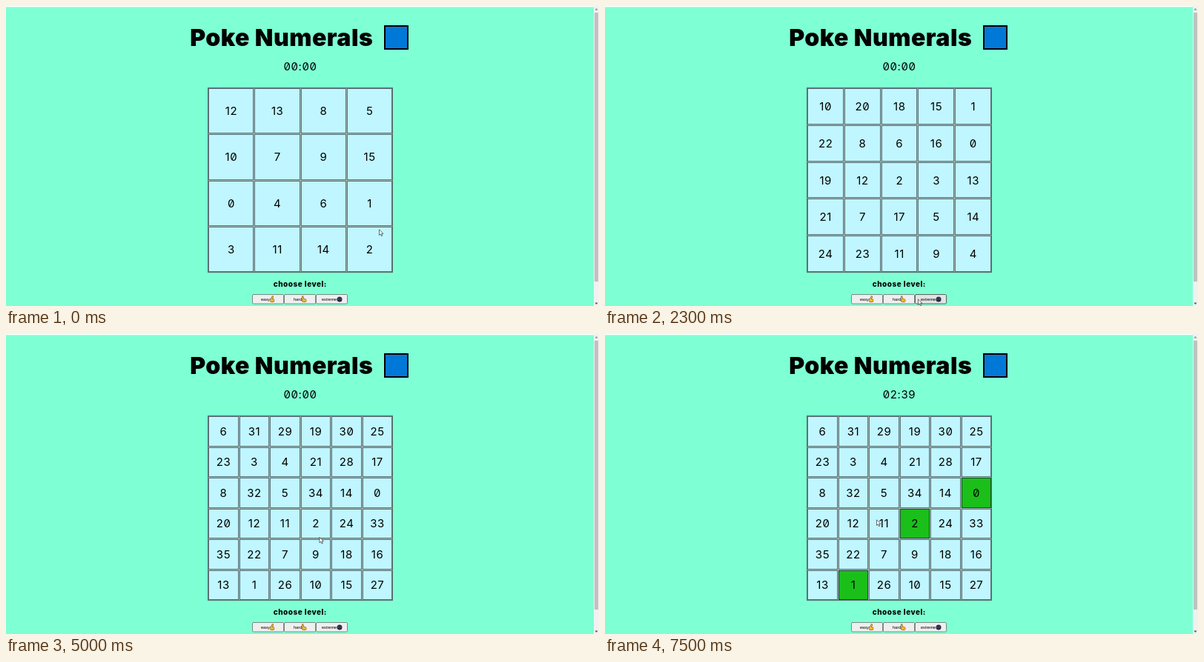
Recreate the animation shown at these times as an HTML page with a canvas. Size 800 by 405 pixels, loop 7600 ms.

```html
<!DOCTYPE html>
<html lang="en">
<head>
<meta charset="utf-8">
<title>Poke Numerals</title>
<style>
  html, body { margin: 0; width: 100%; height: 100%; overflow: hidden; background: #7fffd4; }
  canvas, svg { position: absolute; left: 0; top: 0; width: 800px; height: 405px; }
  text { font-family: Inter, "DejaVu Sans", sans-serif; fill: #000; text-anchor: middle; }
  .num { font-size: 15px; letter-spacing: .6px; font-variant-numeric: slashed-zero; }
  .title { font-size: 32px; font-weight: 900; letter-spacing: .5px; }
  .level { font-size: 10px; font-weight: 800; letter-spacing: .5px; }
  .btn { font: 5.6px "Liberation Sans", Arial, sans-serif; text-anchor: start; }
</style>
</head>
<body>
<canvas id="stage" width="800" height="405"></canvas>
<svg viewBox="0 0 800 405">
  <text class="title" x="371.7" y="54">Poke Numerals</text>
  <text class="num" id="clock" x="397" y="87">00:00</text>
  <g id="nums"></g>
  <text class="level" x="396.8" y="378.5">choose level:</text>
  <text class="btn" x="344" y="397.8">easy</text>
  <text class="btn" x="388" y="397.8">hard</text>
  <text class="btn" x="426" y="397.8">extreme</text>
  <path id="cursor" d="M0 0V7.6L1.8 6L3 8.8L4.3 8.2L3.1 5.5H5.4Z"
        fill="#fff" stroke="#222" stroke-width=".65" stroke-linejoin="round"/>
</svg>

<!-- the text of each board, row by row -->
<template id="boards">
  <p>12 13 8 5
     10 7 9 15
     0 4 6 1
     3 11 14 2</p>
  <p>1 4 2 10
     15 8 11 0
     9 6 14 7
     3 5 12 13</p>
  <p>10 20 18 15 1
     22 8 6 16 0
     19 12 2 3 13
     21 7 17 5 14
     24 23 11 9 4</p>
  <p>6 31 29 19 30 25
     23 3 4 21 28 17
     8 32 5 34 14 0
     20 12 11 2 24 33
     35 22 7 9 18 16
     13 1 26 10 15 27</p>
</template>

<script>
const LOOP = 7600, STEP = 100;
const DEAL = 900;                 // a new board every DEAL ms
const PLAY = 5400, PRESS = 500;   // first press, then one every PRESS ms
const LEFT = 272, TOP = 110, SIDE = 249;
const BUTTONS = [333, 376, 419], BUTTON_W = 41;

const $ = id => document.getElementById(id);
const ctx = $('stage').getContext('2d');
const boards = [...$('boards').content.querySelectorAll('p')].map(p => {
  const cells = p.textContent.trim().split(/\s+/);
  return { cells, n: Math.sqrt(cells.length) };
});

// cursor stops: time, x, y
const stops = [
  [0, 503, 301], [800, 360, 394], [1200, 376, 395], [2300, 422, 395],
  [3200, 437, 393], [4000, 339, 144], [4600, 345, 335], [5400, 500, 212],
  [5800, 347, 339], [6400, 422, 243], [7500, 366, 250]
];

function cursorAt(t) {
  const i = Math.max(1, stops.findIndex(s => s[0] >= t));
  const [t0, x0, y0] = stops[i - 1], [t1, x1, y1] = stops[i];
  let k = (t - t0) / (t1 - t0);
  k *= k * (3 - 2 * k);
  return [x0 + (x1 - x0) * k, y0 + (y1 - y0) * k];
}

function clockText(t) {
  const s = (t - PLAY) / 1000;
  const run = Math.min(157 * s - 12, 80 * s + 73);   // fast at first, then slower
  const v = Math.max(0, Math.floor(run / 10) * 10 - 1);
  const two = n => String(n).padStart(2, '0');
  return two(Math.floor(v / 100)) + ':' + two(v % 100);
}

const isPressed = (v, t) => v < 3 && t >= PLAY + PRESS * v;
const edge = (i, n) => Math.round(SIDE * i / n);

function box(x, y, w, h, fill) {
  ctx.fillStyle = fill;
  ctx.fillRect(x, y, w, h);
}

function frame(x, y, w, h, color) {
  ctx.strokeStyle = color;
  ctx.lineWidth = 1;
  ctx.strokeRect(x + .5, y + .5, w - 1, h - 1);
}

function stroke(x0, y0, x1, y1, width, color) {
  ctx.beginPath();
  ctx.moveTo(x0, y0);
  ctx.lineTo(x1, y1);
  ctx.lineCap = 'round';
  ctx.lineWidth = width;
  ctx.strokeStyle = color;
  ctx.stroke();
}

const dot = (x, y, size, color) => stroke(x, y, x, y, size, color);

function arrow(y, dir, color) {
  ctx.beginPath();
  ctx.moveTo(796.5, y);
  ctx.lineTo(798.5, y + 2.5 * dir);
  ctx.lineTo(794.5, y + 2.5 * dir);
  ctx.fillStyle = color;
  ctx.fill();
}

function drawPage() {
  box(0, 0, 800, 405, '#7fffd4');
  box(0, 0, 800, 1.3, '#fff');
  box(793, 0, 7, 405, '#f1f1f1');
  box(794, 9, 5, 363, '#c1c1c1');
  arrow(3, 1, '#8a8a8a');
  arrow(403, -1, '#505050');
  box(510, 26, 33, 33, '#000');
  box(512, 28, 29, 29, '#0078d7');
}

function drawBoard({ n, cells }, t) {
  box(LEFT, TOP, SIDE + 1, SIDE + 1, '#9db9bb');
  frame(LEFT, TOP, SIDE + 1, SIDE + 1, '#566f70');
  cells.forEach((v, i) => {
    const c = i % n, r = Math.floor(i / n);
    const x = LEFT + edge(c, n) + 1, y = TOP + edge(r, n) + 1;
    const w = LEFT + edge(c + 1, n) - x, h = TOP + edge(r + 1, n) - y;
    const on = n === 6 && isPressed(v, t);
    box(x, y, w, h, on ? '#1abf1a' : '#c0f6ff');
    frame(x, y, w, h, on ? '#1f4a2a' : '#5c7478');
  });
}

function drawHand(x, tilt) {
  for (const [grow, color] of [[1, '#5b4212'], [0, '#fdb92c']]) {
    stroke(x, 397.4, x + 2, 397.6, 3.6 + grow, color);
    stroke(x, 396, x + tilt, 392.6, 1.4 + grow, color);
  }
}

function drawButtons(mx, my) {
  for (const x of BUTTONS) {
    const over = my > 389 && mx > x && mx < x + BUTTON_W + 2.5;
    ctx.beginPath();
    ctx.roundRect(x - .5, 389.5, BUTTON_W + 1, 12.5, 1.2);
    ctx.fillStyle = over ? '#e3e3e3' : '#efefef';
    ctx.fill();
    ctx.strokeStyle = over ? '#4f5553' : '#747d7a';
    ctx.lineWidth = .9;
    ctx.stroke();
  }
  drawHand(358, 1.8);
  drawHand(401.2, -1);
  dot(450, 396, 7, '#2a2c45');
  dot(448.7, 395.6, 1.2, '#6c74a8');
  dot(451.3, 395.6, 1.2, '#6c74a8');
}

let shown = null;
function setNumbers(board) {
  if (board === shown) return;
  shown = board;
  const { n, cells } = board, size = SIDE / n;
  nums.replaceChildren(...cells.map((v, i) => {
    const el = document.createElementNS(nums.namespaceURI, 'text');
    el.setAttribute('class', 'num');
    el.setAttribute('x', LEFT + .8 + (i % n + .5) * size);
    el.setAttribute('y', TOP + 6 + (Math.floor(i / n) + .5) * size);
    el.textContent = v;
    return el;
  }));
}

const nums = $('nums');
function draw(now) {
  const t = Math.floor(now % LOOP / STEP) * STEP;
  const board = boards[Math.min(boards.length - 1, Math.floor(t / DEAL))];
  const [mx, my] = cursorAt(t);
  drawPage();
  drawBoard(board, t);
  drawButtons(mx, my);
  setNumbers(board);
  $('clock').textContent = clockText(t);
  $('cursor').setAttribute('transform', `translate(${mx + .5} ${my + .8})`);
}

const start = performance.now();
function loop() {
  draw(performance.now() - start);
  requestAnimationFrame(loop);
}
loop();
</script>
</body>
</html>
```
